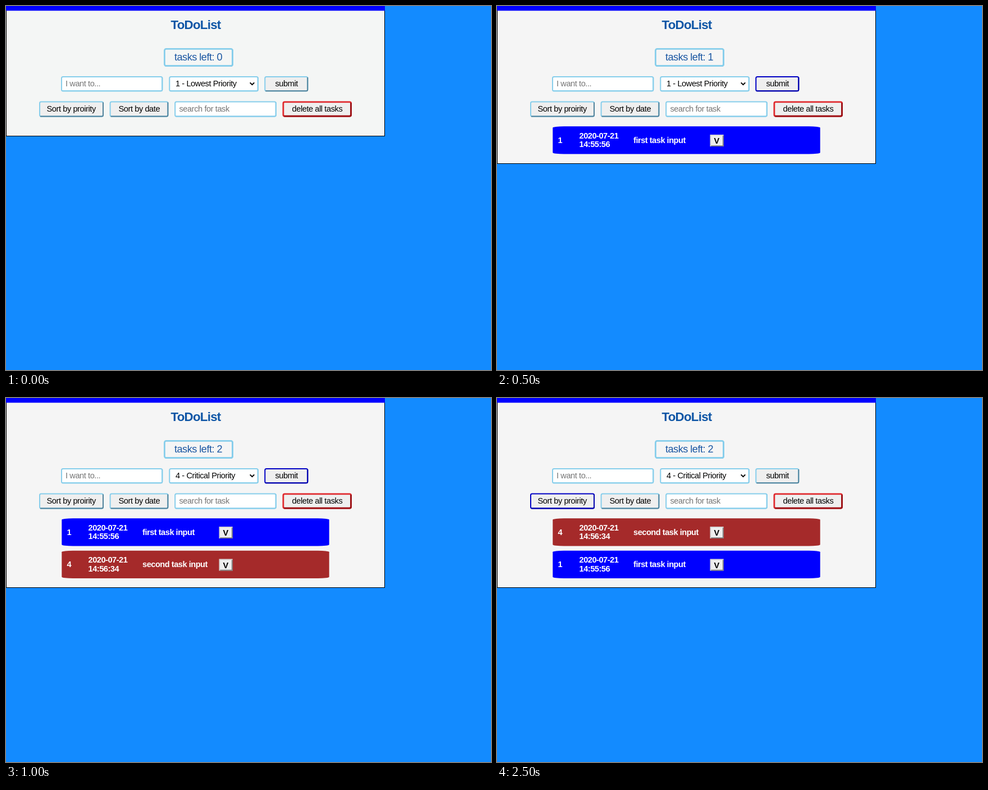
Recreate the animation shown at these times as an HTML page. Size 864x648 px, loop 3 s.

```html
<!DOCTYPE html>
<html lang="en">
<head>
<meta charset="utf-8">
<title>Task list</title>
<style>
  html, body { margin: 0; width: 100%; height: 100%; overflow: hidden; background: #138bff; }
  svg { display: block; }
  text { font: 14.6px "Liberation Sans", Arial, sans-serif; letter-spacing: -0.029em; fill: #000; white-space: pre; }
  .title, .task, .check { font-weight: bold; letter-spacing: -0.033em; }
  .title { font-size: 22.3px; fill: #0d55a5; }
  .count { font-size: 18.2px; fill: #1a56a2; }
  .hint { fill: #757575; }
  .task { fill: #fff; }
</style>
</head>
<body>
<script>
const LOOP = 3000, ROW_STEP = 57.5;
const first = { level: 1, time: "14:55:56", name: "first task input", color: "#00f" };
const second = { level: 4, time: "14:56:34", name: "second task input", color: "#a52a2a" };
const low = "1 - Lowest Priority", critical = "4 - Critical Priority";

const states = [
  { at: 0, height: 232, paper: "#f4f6f5", choice: low, tasks: [] },
  { at: 500, height: 281, paper: "#f5f5f5", choice: low, tasks: [first], active: "submit" },
  { at: 1000, height: 338, paper: "#f5f5f5", choice: critical, tasks: [first, second], active: "submit" },
  { at: 2500, height: 338, paper: "#f5f5f5", choice: critical, tasks: [second, first], active: "sort" }
];

// Each pair is the lit edge (top, left) and the shaded edge (right, bottom).
const sky = ["#87ceeb", "#87ceeb"];
const raised = ["#87ceeb", "#4f819a"];
const focus = ["#0000c4", "#0000ac"];
const danger = ["#e02a2e", "#9a1015"];
const gray = ["#d4d4d4", "#7c7c7c"];

function shape(tag, attrs, parent = svg) {
  const node = document.createElementNS("http://www.w3.org/2000/svg", tag);
  for (const key in attrs) node.setAttribute(key, attrs[key]);
  if (parent) parent.append(node);
  return node;
}

function label(kind, x, y, words, parent = svg) {
  const node = shape("text", { class: kind, x, y }, parent);
  node.textContent = words;
  return node;
}

function box(x, y, w, h, fill, edges, line = 2, r = 2.5, parent = svg) {
  const half = line / 2, right = x + w - half, bottom = y + h - half;
  const lit = shape("rect", {
    x: x + half, y: y + half, width: w - line, height: h - line, rx: r, fill, "stroke-width": line
  }, parent);
  const shade = shape("path", {
    d: `M${x + line} ${bottom}H${right - r}Q${right} ${bottom} ${right} ${bottom - r}V${y + line}`,
    fill: "none", "stroke-width": line
  }, parent);
  const paint = ([light, dark]) => {
    lit.setAttribute("stroke", light);
    shade.setAttribute("stroke", dark);
  };
  paint(edges);
  return paint;
}

const svg = shape("svg", { width: 864, height: 648 }, document.body);
const panel = shape("rect", { x: 0.5, y: 0.5, width: 674, stroke: "#000" });
shape("rect", { width: 675, height: 8.4, fill: "#00f" });

box(281, 75, 124, 33, "none", sky, 2.8, 3);
box(98, 125, 181.3, 27.2, "#fff", sky);
box(290.3, 125, 159.5, 27.2, "#fff", sky);
box(300.2, 169.5, 181.6, 28, "#fff", sky);
box(184.6, 169.5, 104.8, 28, "#efefef", raised);
box(492.5, 169.5, 123.5, 28, "#efefef", danger, 2.8);
const buttons = {
  submit: box(460.3, 125, 78, 27.2, "#efefef", raised),
  sort: box(59, 169.5, 115, 28, "#efefef", raised)
};

label("title", 293.5, 41, "ToDoList");
const count = label("count", 300, 97, "");
label("hint", 106, 143, "I want to...");
const choice = label("", 302, 143, "");
label("", 479.5, 143, "submit");
label("", 72.5, 188, "Sort by proirity");
label("", 200.5, 188, "Sort by date");
label("hint", 308.5, 188, "search for task");
label("", 509.5, 188, "delete all tasks");
shape("path", { d: "M434.7 136.4l3.8 3.8 3.8-3.8", fill: "none", stroke: "#000", "stroke-width": 2 });

const rows = [0, 1].map(i => {
  const group = shape("g", { transform: `translate(0 ${i * ROW_STEP})` });
  const bar = shape("rect", { x: 99.3, y: 214.2, width: 476.4, height: 49.2, rx: 20, ry: 2.5 }, group);
  box(379.5, 229, 24.2, 21, "#efefef", gray, 1.8, 0, group);
  label("check", 386.5, 245, "V", group);
  label("task", 146.5, 235.5, "2020-07-21", group);
  return {
    group, bar,
    level: label("task", 108.5, 243.5, "", group),
    time: label("task", 146.5, 251, "", group),
    name: label("task", 243, 243.5, "", group)
  };
});

function render(state) {
  panel.setAttribute("height", state.height - 1);
  panel.setAttribute("fill", state.paper);
  count.textContent = "tasks left: " + state.tasks.length;
  choice.textContent = state.choice;
  for (const key in buttons) buttons[key](key === state.active ? focus : raised);
  rows.forEach((row, i) => {
    const task = state.tasks[i];
    row.group.style.display = task ? "" : "none";
    if (!task) return;
    row.bar.setAttribute("fill", task.color);
    for (const key of ["level", "time", "name"]) row[key].textContent = task[key];
  });
}

const start = performance.now();
let shown;
function tick() {
  const t = (performance.now() - start) % LOOP;
  const state = states.filter(s => s.at <= t).pop();
  if (state !== shown) render(shown = state);
  requestAnimationFrame(tick);
}
tick();
</script>
</body>
</html>
```
